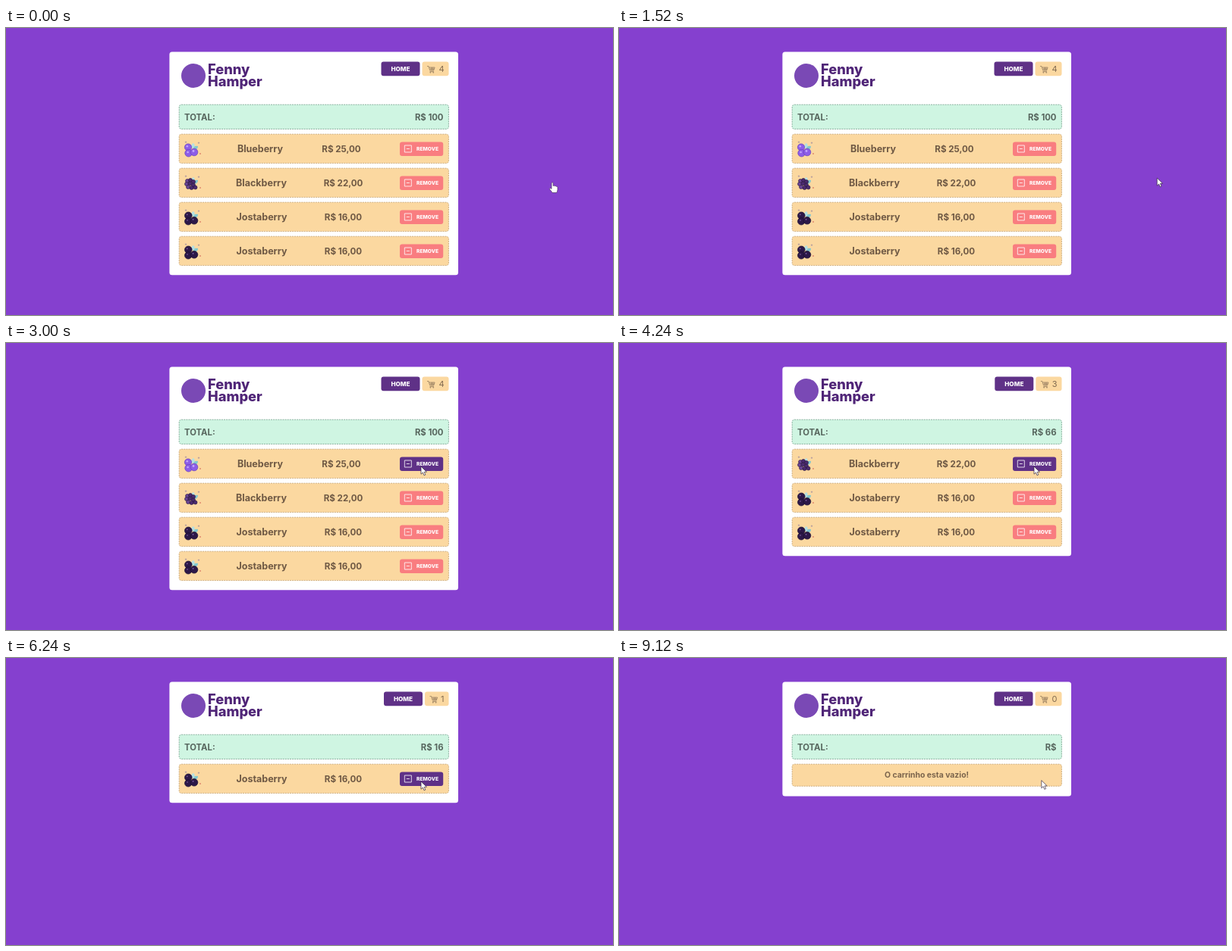
Animation of 800 by 379 pixels, one loop 10000 ms. Source, as an HTML page:

```html
<!DOCTYPE html>
<html lang="pt-BR">
<head>
<meta charset="utf-8">
<title>Cart</title>
<style>
  html, body { margin: 0; width: 100%; height: 100%; overflow: hidden; background: #8540cf; }
  svg { display: block; width: 100%; height: 100%; font-family: Inter, "Open Sans", sans-serif; font-weight: 700; }
  .brand { font-size: 18.3px; font-weight: 800; fill: #4f2477; }
  .dash { stroke-width: .8; stroke-dasharray: 2 1.1; }
  .mint { fill: #cff5e2; stroke: #729f8a; }
  .peach { fill: #fbd8a0; stroke: #c3a06c; }
  .sum { font-size: 11.3px; fill: #57665e; }
  .name { font-size: 12.5px; fill: #6f5944; }
  .price { font-size: 11.6px; fill: #6f5944; }
  .note { font-size: 10.4px; fill: #7b644c; }
  .count { font-size: 11px; font-weight: 400; fill: #80694f; }
  .home { font-size: 8.2px; font-weight: 800; fill: #fff; }
  .remove { font-size: 6.7px; font-weight: 800; fill: #fff; }
  .mid { text-anchor: middle; }
  .end { text-anchor: end; }
</style>
</head>
<body>
<svg viewBox="0 0 800 379">
  <defs>
    <g id="stars" fill="none" stroke-width=".7">
      <path d="M3 1.5v2.4M1.8 2.7h2.4M20 2.5v2.4M18.8 3.7h2.4" stroke="#a08a9c"/>
      <path d="M22 17v2M21 18h2" stroke="#d7755c"/>
    </g>
    <g id="leaves">
      <path d="M10 10Q10 5 13 4Q16 6 14 11Z" fill="#b5e0e2"/>
      <path d="M13 11Q14 7 19 8Q19 12 15 13Z" fill="#83c8cf"/>
    </g>
    <g id="Blueberry">
      <use href="#stars"/><use href="#leaves"/>
      <g fill="#8d5de8" stroke="#6741bb" stroke-width=".7">
        <circle cx="6" cy="9.5" r="4.6"/><circle cx="6.6" cy="17.2" r="4.8"/><circle cx="14" cy="16" r="4.8"/>
      </g>
      <g fill="#c3a5fb"><circle cx="4.8" cy="8.3" r="1.3"/><circle cx="5.6" cy="16" r="1.3"/><circle cx="13" cy="14.5" r="1.4"/></g>
    </g>
    <g id="Blackberry">
      <use href="#stars"/><use href="#leaves"/>
      <g id="drupes" stroke="#24143b" stroke-width=".6"></g>
    </g>
    <g id="Jostaberry">
      <use href="#stars"/><use href="#leaves"/>
      <g fill="#2c1848" stroke="#1b0f30" stroke-width=".7">
        <circle cx="6.3" cy="9.8" r="4.8"/><circle cx="6.2" cy="17.3" r="4.7"/><circle cx="14" cy="16.3" r="4.8"/>
      </g>
      <g fill="#8465a8"><circle cx="4.8" cy="8.4" r=".8"/><circle cx="5" cy="16" r=".8"/><circle cx="12.6" cy="14.8" r=".9"/></g>
    </g>
  </defs>

  <rect width="800" height="379" fill="#8540cf"/>
  <rect id="card" x="215.4" y="31.4" width="380.6" rx="3.5" fill="#fff"/>
  <circle cx="247" cy="63" r="16" fill="#7a49b5"/>
  <g class="brand"><text x="266" y="61">Fenny</text><text x="266" y="77">Hamper</text></g>

  <g id="home">
    <rect y="44.5" width="51" height="18.7" rx="3" fill="#5f3187"/>
    <text class="home mid" x="25.5" y="56.8">HOME</text>
  </g>
  <g id="badge">
    <rect y="44.5" height="18.7" rx="3" fill="#fbd8a0"/>
    <g fill="none" stroke="#76604a" stroke-width=".6">
      <path d="M6.5 50.5h2l1.7 5.5h5l1.4-4H9M10 57.6h5.5M10 54h6M12 52v4M14 52v4"/>
      <circle cx="10.8" cy="58.8" r=".5"/><circle cx="14.7" cy="58.8" r=".5"/>
    </g>
    <text class="count end" y="58"></text>
  </g>

  <rect class="dash mint" x="228.2" y="101.2" width="355.2" height="32.2" rx="3"/>
  <text class="sum" x="235" y="121.8">TOTAL:</text>
  <text id="total" class="sum end" x="576.5" y="121.8"></text>

  <g id="rows"></g>
  <g id="empty">
    <rect class="dash peach" x="228.2" y="140.2" width="355.2" height="29" rx="3"/>
    <text class="note mid" x="405.5" y="158.4">O carrinho esta vazio!</text>
  </g>

  <g id="arrow">
    <path d="M0 0V10.2L2.4 8L4 11.8L5.8 11L4.2 7.3H7.4Z" fill="#fff" stroke="#33283f" stroke-width=".7" stroke-linejoin="round"/>
  </g>
  <g id="hand">
    <path d="M-1 1Q0-.5 1.1 1V5Q2.4 4.1 3.3 5.2Q4.6 4.6 5.3 5.8Q6.8 5.4 7 7V10Q6.7 12 5.7 14H0Q-1.2 11.7-3.2 9.8Q-4.2 8.4-3 7.9Q-2 7.7-1 9Z" fill="#fff" stroke="#4a3264" stroke-width=".7" stroke-linejoin="round"/>
  </g>
</svg>
<script>
const LOOP = 10000;
const $ = id => document.getElementById(id);

// name, price, name centre, price centre
const items = [
  ["Blueberry", 25, 335, 442],
  ["Blackberry", 22, 336.5, 444.5],
  ["Jostaberry", 16, 337, 444.5],
  ["Jostaberry", 16, 337, 444.5]
];
const clicks = [3700, 4750, 5800, 7000];

// time, x, y of the pointer tip
const path = [
  [0, 720, 203.5],
  [1400, 720, 203.5],
  [2040, 604.5, 145],
  [2180, 604.5, 145],
  [2750, 547, 163],
  [7500, 547, 163],
  [8000, 556.8, 161.6]
];

const drupes = [[5, 9], [9, 8], [13, 10], [4, 13], [8.5, 12.5], [13, 14.5], [6, 17], [10.5, 18], [15.5, 17.5]];
$("drupes").innerHTML = drupes.map(([x, y], i) =>
  `<circle cx="${x}" cy="${y}" r="2.5" fill="${i % 3 ? "#4b2b70" : "#6c4796"}"/>`).join("");

$("rows").innerHTML = items.map(([name, price, nameX, priceX]) => `
  <g>
    <rect class="dash peach" x="228.2" y="140.2" width="355.2" height="38.4" rx="3"/>
    <use href="#${name}" x="234" y="148"/>
    <text class="name mid" x="${nameX}" y="163.8">${name}</text>
    <text class="price mid" x="${priceX}" y="163.8">R$ ${price},00</text>
    <rect class="button" x="519" y="150.4" width="57.2" height="18.5" rx="3"/>
    <path d="M525.3 155h9v9h-9zM527.8 159.5h4" fill="none" stroke="#fff" stroke-width=".8"/>
    <text class="remove mid" x="555.5" y="162">REMOVE</text>
  </g>`).join("");

const rows = [...$("rows").children];
const buttons = rows.map(row => row.querySelector(".button"));
const badgeBox = $("badge").querySelector("rect");
const badgeText = $("badge").querySelector("text");
const ease = p => p * p * (3 - 2 * p);
const show = (el, on) => el.setAttribute("display", on ? "inline" : "none");
const move = (el, x, y) => el.setAttribute("transform", `translate(${x} ${y})`);

function pointerAt(t) {
  const i = path.findIndex(step => step[0] > t);
  if (i < 0) return path[path.length - 1].slice(1);
  const [t0, x0, y0] = path[i - 1], [t1, x1, y1] = path[i];
  const p = ease((t - t0) / (t1 - t0));
  return [x0 + (x1 - x0) * p, y0 + (y1 - y0) * p];
}

function drawCart(removed, x, y) {
  const left = items.length - removed;
  const badgeWidth = { 1: 31.5, 2: 34.3, 3: 34.2 }[left] || 35;
  const badgeX = 583.5 - badgeWidth;

  $("card").setAttribute("height", left ? 114.8 + 45 * left : 151);
  $("total").textContent = left ? "R$ " + items[removed][1] * left : "R$";
  badgeText.textContent = left;
  badgeText.setAttribute("x", badgeWidth - 6);
  badgeBox.setAttribute("width", badgeWidth);
  move($("badge"), badgeX, 0);
  move($("home"), badgeX - 54, 0);
  show($("empty"), !left);

  rows.forEach((row, i) => {
    const top = (i - removed) * 45;
    const hover = x > 518 && x < 577 && y > top + 150 && y < top + 169;
    show(row, i >= removed);
    move(row, 0, top);
    buttons[i].setAttribute("fill", hover ? "#5f3187" : "#f97d80");
  });
}

function frame(now) {
  const t = now % LOOP;
  const [x, y] = pointerAt(t);
  const resting = t < path[1][0];
  drawCart(clicks.filter(c => t >= c).length, x, y);
  show($("hand"), resting);
  show($("arrow"), !resting);
  move(resting ? $("hand") : $("arrow"), x, y);
}

const start = performance.now();
(function tick() {
  frame(performance.now() - start);
  requestAnimationFrame(tick);
})();
</script>
</body>
</html>
```
